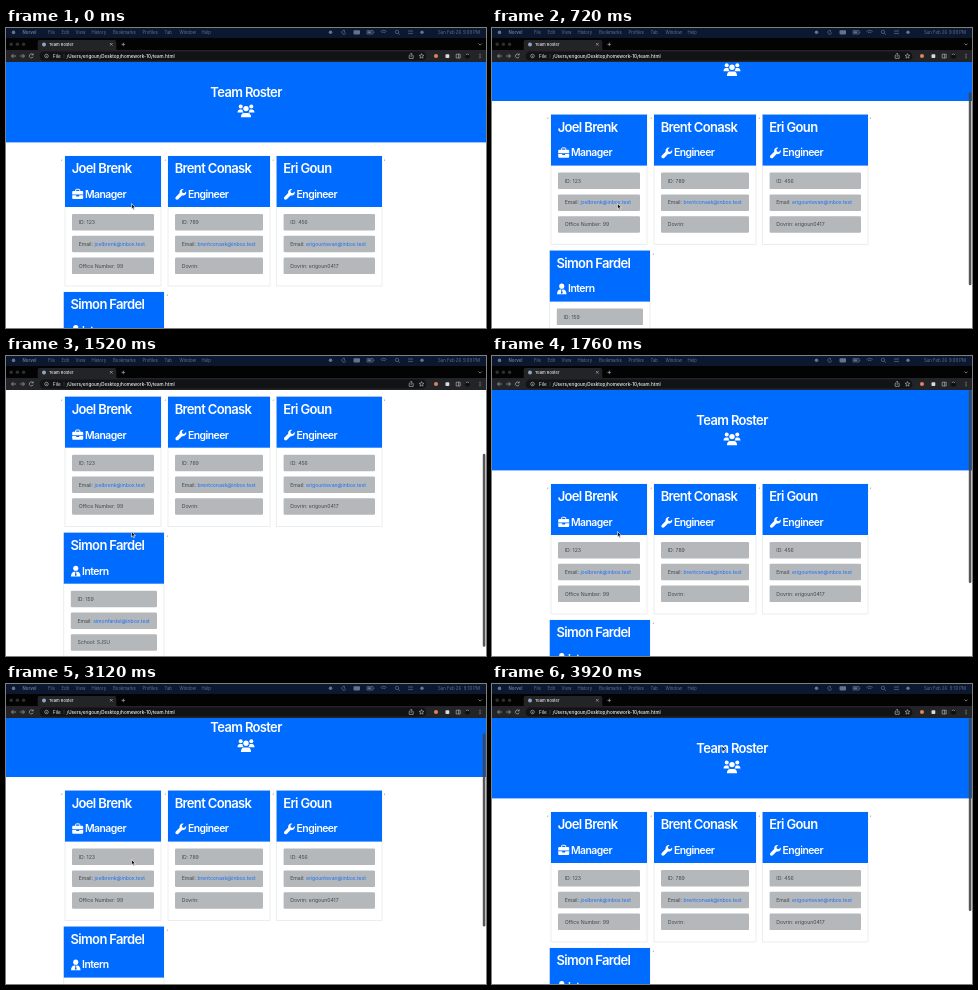
Recreate the animation shown at these times as an HTML page. Size 480 by 300 pixels, loop 4000 ms.

```html
<!DOCTYPE html>
<html lang="en">
<head>
<meta charset="utf-8">
<title>Team Roster</title>
<style>
  html, body { margin: 0; width: 100%; height: 100%; overflow: hidden; background: #fff; }
  svg { display: block; width: 480px; height: 300px; font-family: Inter, "Liberation Sans", sans-serif; }
  text { white-space: pre; }
  .h1 { font-size: 13px; font-weight: 600; letter-spacing: -.05em; fill: #fff; }
  .h2 { font-size: 10.4px; font-weight: 600; letter-spacing: -.05em; fill: #fff; }
  .row { font-size: 5.2px; letter-spacing: -.01em; fill: #44484c; }
  .link { fill: #1f70f5; }
  .menu { font-size: 4.3px; fill: #66718a; }
  .tab { font-size: 4.1px; font-weight: 500; fill: #e2e4e7; }
  .url { font-size: 4.6px; fill: #f1f2f4; }
  .line { fill: none; stroke: #a9abaf; stroke-width: .7; }
  .dim { fill: none; stroke: #66718a; stroke-width: .7; }
</style>
</head>
<body>
<svg viewBox="0 0 480 300">
  <defs>
    <g id="person"><circle cx="5" cy="2.8" r="2.7"/><path d="M0 11.4C0 8 1.6 6.4 3.4 6.4h3.2C8.4 6.4 10 8 10 11.4z"/></g>
    <g id="users">
      <circle cx="3.2" cy="2.6" r="2"/><circle cx="13.8" cy="2.6" r="2"/><circle cx="8.5" cy="4.6" r="2.7"/>
      <path d="M0 8.6C0 6.4 1.3 5.4 2.4 5.4h1.8l.9.3C5 7 5.5 7.9 6.2 8.6zM17 8.6c0-2.2-1.3-3.2-2.4-3.2h-1.8l-.9.3c.1 1.3-.4 2.2-1.1 2.9zM3.4 13.3c0-2.9 1.5-4.4 3.3-4.4h3.6c1.8 0 3.3 1.5 3.3 4.4z"/>
    </g>
    <g id="briefcase">
      <path d="M3.4 2.4V1.2Q3.4.4 4.2.4h2.6q.8 0 .8.8v1.2" fill="none" stroke="#fff" stroke-width="1"/>
      <path d="M0 5.7V3.2q0-1 1-1h9q1 0 1 1v2.5zM0 6.4h4v1.1h3V6.4h4v2.8q0 1-1 1H1q-1 0-1-1z"/>
    </g>
    <path id="wrench" d="M10.9 2.5 9 4.4 7.1 3.9 6.6 2 8.5.2C6-.5 3.9 1.6 4.4 4.2L.6 8C-.8 9.6 1.4 11.8 3 10.4l3.8-3.8c2.6.5 4.8-1.5 4.1-4.1z"/>
    <g id="tie"><use href="#person" transform="scale(.95)"/><path d="M4 6.1h1.5l-.4 1.1.6 2.3-.95 1.1-.95-1.1.6-2.3z" fill="#006bff"/></g>
  </defs>
  <rect width="480" height="300" fill="#fff"/>
  <g id="page"></g>
  <rect id="thumb" x="476.8" width="2.6" height="193" rx="1.3" fill="#444"/>
  <g id="chrome"></g>
  <path id="pointer" d="M0 0v5.6l1.3-1.2.9 2 .9-.4-.9-1.9h1.8z" fill="#111" stroke="#fff" stroke-width=".6"/>
</svg>
<script>
const $ = id => document.getElementById(id);
const text = (x, y, cls, s, more = '') => `<text x="${x}" y="${y}" class="${cls}" ${more}>${s}</text>`;
const rect = (x, y, w, h, fill, more = '') => `<rect x="${x}" y="${y}" width="${w}" height="${h}" fill="${fill}" ${more}/>`;
const dot = (x, y, r, fill) => `<circle cx="${x}" cy="${y}" r="${r}" fill="${fill}"/>`;
const line = (d, cls = 'line') => `<path class="${cls}" d="${d}"/>`;
const icon = (id, x, y) => `<use href="#${id}" x="${x}" y="${y}" fill="#fff"/>`;
const BLUE = '#006bff', BAR = '#232427', DIM = '#66718a', LIGHT = '#a9abaf';

const cards = [
  { x: 59, y: 128, w: 96, name: 'Joel Brenk', role: 'Manager', icon: 'briefcase', dx: 20,
    id: 123, mail: 'joelbrenk', extra: 'Office Number: 99' },
  { x: 162, y: 128, w: 102, name: 'Brent Conask', role: 'Engineer', icon: 'wrench', dx: 20,
    id: 789, mail: 'brentconask', extra: 'Dovrin:' },
  { x: 270.6, y: 128, w: 105.4, name: 'Eri Goun', role: 'Engineer', icon: 'wrench', dx: 20,
    id: 456, mail: 'erigountevan', extra: 'Dovrin: erigoun0417' },
  { x: 57.8, y: 264, w: 100.2, name: 'Simon Fardel', role: 'Intern', icon: 'tie', dx: 18.3,
    id: 159, mail: 'simonfardel', extra: 'School: SJSU' }
];

function card(c) {
  const rows = [`ID: ${c.id}`, `Email: <tspan class="link">${c.mail}@inbox.test</tspan>`, c.extra];
  return rect(c.x, c.y, c.w, 130, '#fff', 'stroke="#dfe1e3" stroke-width=".6"') +
    rect(c.x, c.y, c.w, 51, BLUE) +
    text(c.x + 6.7, c.y + 17.4, 'h1', c.name) +
    icon(c.icon, c.x + 7.2, c.y + 32.9) +
    text(c.x + c.dx, c.y + 41.9, 'h2', c.role) +
    rows.map((s, i) => {
      const y = c.y + 58 + i * 21.8;
      return rect(c.x + 7, y, c.w - 14, 16.5, '#b4b8bb', 'rx="1.2"') + text(c.x + 13.7, y + 10.1, 'row', s);
    }).join('');
}

$('page').innerHTML =
  rect(0, 34, 480, 80.4, BLUE) +
  text(240, 69.1, 'h1', 'Team Roster', 'text-anchor="middle"') +
  icon('users', 231.5, 76) +
  cards.map(card).join('') +
  [[55.2, 131.6], [158.4, 131.6], [266.6, 131.6], [378, 131.6], [160.6, 267.4]]
    .map(([x, y]) => text(x, y, 'row', ',')).join('');

const menus = [['File', 42], ['Edit', 55.5], ['View', 69.5], ['History', 85.5], ['Bookmarks', 107],
  ['Profiles', 136.5], ['Tab', 158.5], ['Window', 173.5], ['Help', 195.5]];

$('chrome').innerHTML =
  rect(0, 0, 480, 10, '#0b1830') + rect(0, 10, 480, 13, '#030304') + rect(0, 22, 480, 12, BAR) +
  // menu bar
  dot(7.5, 4.4, 1.8, DIM) +
  text(16.5, 5.8, 'menu', 'Norvel', 'font-weight="700"') +
  menus.map(([s, x]) => text(x, 5.8, 'menu', s)).join('') +
  dot(324.5, 4.2, 1.8, DIM) +
  line('M338.6 2.4a2 2 0 1 0 1 2.8 2 2 0 0 1-1-2.8z', 'dim') +
  rect(347.5, 2.2, 6.5, 4.2, DIM, 'rx=".8"') +
  line('M361 2.6h6v3.4h-6zM367.9 3.6v1.4', 'dim') + rect(361.7, 3.3, 3.6, 2, DIM) +
  line('M374.6 3.4q3-2.4 6 0M375.8 4.8q1.8-1.4 3.6 0', 'dim') +
  line('M392.3 5.2l1.7 1.6', 'dim') + '<circle class="dim" cx="391" cy="3.9" r="1.7"/>' +
  line('M402 3h5M402 5.4h5', 'dim') + dot(416, 4.2, 1.7, DIM) +
  text(432, 5.8, 'menu', 'Sun Feb 26') + text(474, 5.8, 'menu', '', 'id="clock" text-anchor="end"') +
  // tab strip
  [5.2, 11.4, 17.6].map(x => dot(x, 16.2, 1.7, '#2f3033')).join('') +
  `<path d="M29.5 23q2.2 0 2.2-2v-7q0-2 2-2h74.6q2 0 2 2v7q0 2 2.2 2z" fill="${BAR}"/>` +
  dot(38, 16.6, 2, '#8fa5c4') + text(43, 18, 'tab', 'Team Roster') +
  line('M104 15l2.6 2.6M106.6 15l-2.6 2.6M115.5 16.4h3.6M117.3 14.6v3.6M472.6 15.6l1.5 1.5 1.5-1.5') +
  // toolbar
  line('M10 28H5.6M7.5 26l-2 2 2 2M14 28h4.4M16.5 26l2 2-2 2') +
  line('M27 26.8a2 2 0 1 0 .2 1.9M27.2 25.4v1.6h-1.6') +
  rect(33.5, 23.6, 387, 9, '#121315', 'rx="4.5"') +
  '<circle class="line" cx="40.5" cy="28" r="1.8"/>' + rect(40.2, 27.6, .6, 1.5, LIGHT) +
  text(47, 29.6, 'url', 'File') + rect(57.8, 25.8, .4, 4.4, '#666') +
  text(60.5, 29.6, 'url', '/Users/erigoun/Desktop/homework-10/team.html', 'font-weight="500"') +
  line('M404 27.4h-.8v3h4v-3h-.8M405.2 29v-3.6M404 26.4l1.2-1.2 1.2 1.2') +
  line('M415.5 25.6l.7 1.6 1.7.2-1.3 1.1.4 1.7-1.5-.9-1.5.9.4-1.7-1.3-1.1 1.7-.2z') +
  dot(430, 28, 2, '#e0835f') + rect(439.5, 26.2, 3.8, 3.8, '#d8dadd', 'rx=".8"') +
  line('M450.2 26.2h4v3.8h-4zM452.6 26.2v3.8') +
  dot(461.5, 28, 2.6, '#0e0f10') + line('M459.8 26.9q1.700-2 3.4 0') +
  [26.2, 28, 29.8].map(y => dot(474, y, .55, LIGHT)).join('');

// Tracks of [time, value...], linear between neighbours.
const LOOP = 4000, STEP = 80;
const scrollKeys = [[0, 0], [400, 0], [720, 41.4], [1120, 96], [1440, 96], [1520, 87.3], [1680, 0],
  [2960, 0], [3120, 21.4], [3440, 96], [3600, 96], [3760, 0]];
const thumbKeys = [[0, 0], [400, 0], [480, 1], [1840, 1], [2080, 0], [2960, 0], [3040, 1]];
const pointerKeys = [[0, 125.5, 175.5], [3680, 125.5, 175.5], [3920, 230, 62]];

function at(keys, t) {
  const i = keys.findIndex(k => k[0] > t);
  if (i < 0) return keys[keys.length - 1].slice(1);
  const a = keys[i - 1], b = keys[i], p = (t - a[0]) / (b[0] - a[0]);
  return a.slice(1).map((v, j) => v + (b[j + 1] - v) * p);
}

function draw(now) {
  const t = Math.floor((now % LOOP) / STEP) * STEP;
  const [scroll] = at(scrollKeys, t);
  const [x, y] = at(pointerKeys, t);
  $('page').setAttribute('transform', `translate(0 ${-scroll})`);
  $('thumb').setAttribute('y', 34 + scroll * .73);
  $('thumb').setAttribute('opacity', at(thumbKeys, t)[0] * .9);
  $('pointer').setAttribute('transform', `translate(${x} ${y})`);
  $('clock').textContent = t < 2640 ? '9:09 PM' : '9:10 PM';
}

const start = performance.now();
function tick() {
  draw(performance.now() - start);
  requestAnimationFrame(tick);
}
tick();
</script>
</body>
</html>
```
